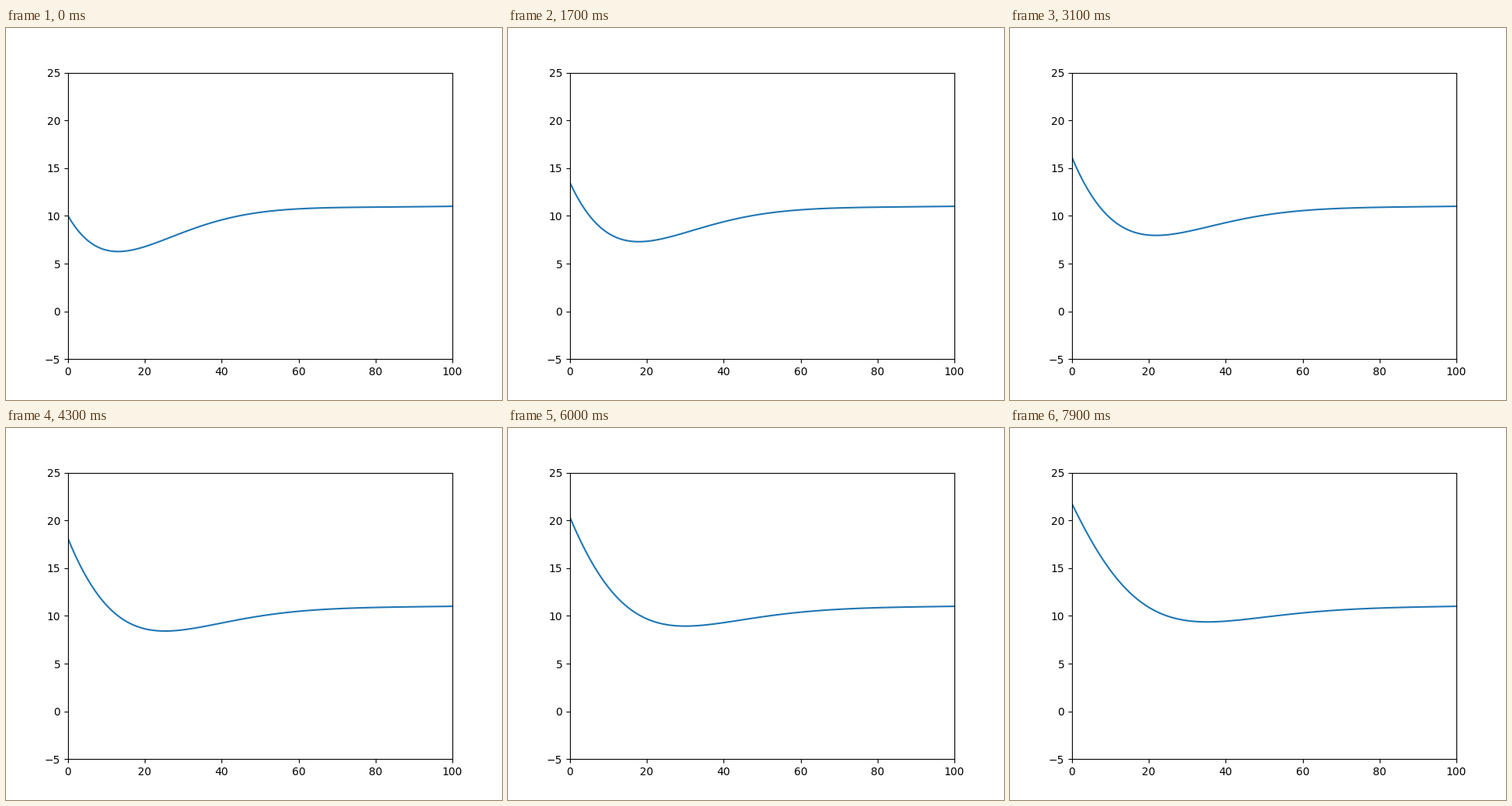
Animation of 640 by 480 pixels, one loop 8 s. Source, as a matplotlib script:

```python
import numpy as np
import matplotlib.pyplot as plt
from matplotlib.animation import FuncAnimation

# Seasonal heat wave diffusing into the ground, one day per frame
DAYS = 80
OMEGA = 2 * np.pi / 365
DIFFUSIVITY = 0.1
DEPTH = 20.0
MEAN, SWING, BOTTOM = 10.0, 12.0, 11.0

x = np.arange(101)
z = x * DEPTH / 100
q = (1 + 1j) * np.sqrt(OMEGA / (2 * DIFFUSIVITY))
profile = np.sinh(q * (DEPTH - z)) / np.sinh(q * DEPTH)
base = MEAN + (BOTTOM - MEAN) * z / DEPTH


def temperature(day):
    return base + SWING * np.imag(np.exp(1j * OMEGA * day) * profile)


fig, ax = plt.subplots(figsize=(6.4, 4.8), dpi=100)
ax.set_xlim(0, 100)
ax.set_ylim(-5, 25)
line, = ax.plot(x, temperature(0))


def update(day):
    line.set_ydata(temperature(day))
    return line,


anim = FuncAnimation(fig, update, frames=DAYS, interval=100,
                     repeat=True, repeat_delay=0, blit=False)
plt.show()
```
